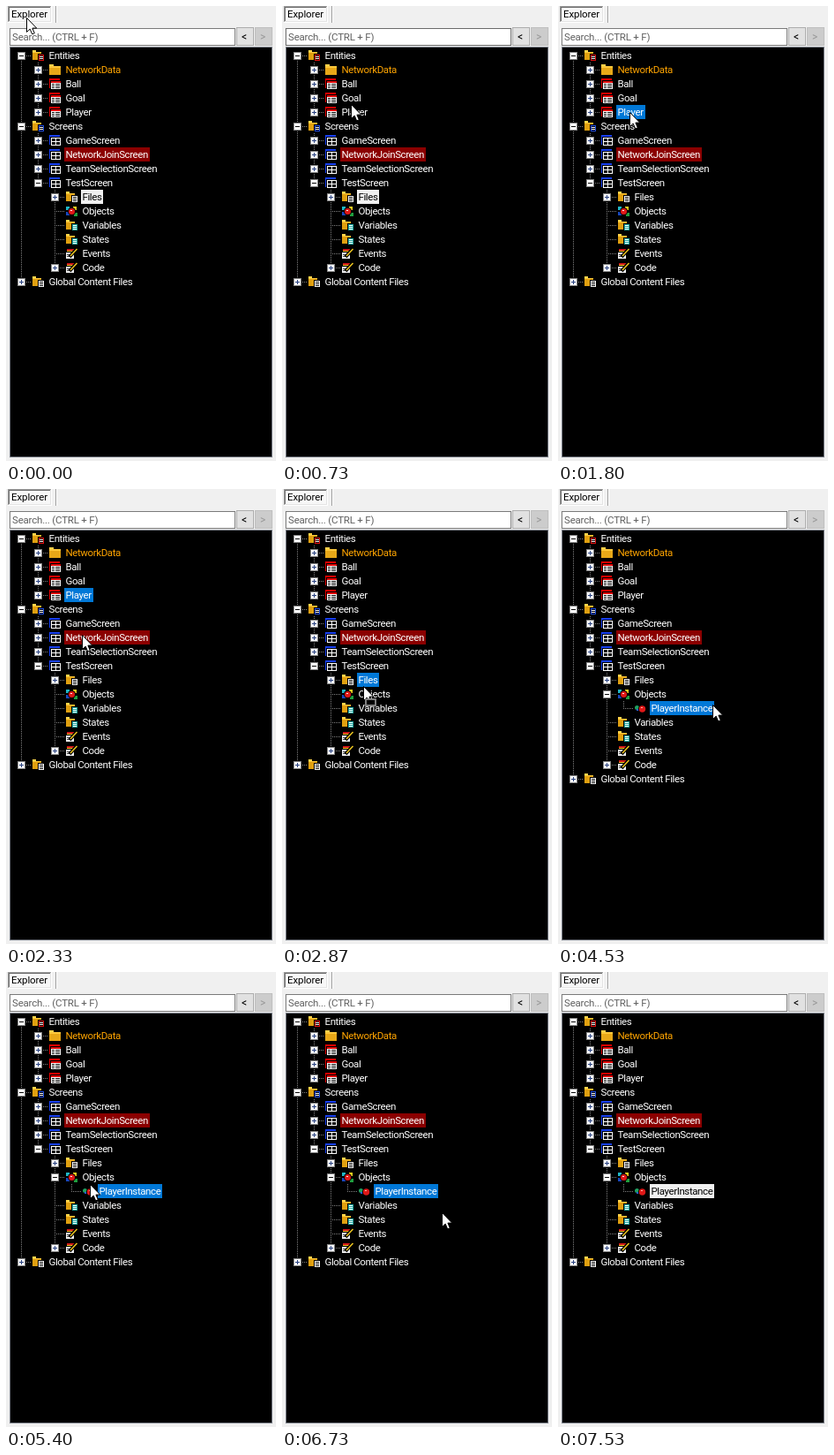
These frames come from a looping animation (306 px wide and 515 px high, 7590 ms). An HTML page with a canvas:

```html
<!DOCTYPE html>
<html lang="en">
<head>
<meta charset="utf-8">
<title>Explorer tree</title>
<style>
  html, body { margin: 0; width: 100%; height: 100%; overflow: hidden; background: #f0f0f0; }
  canvas { display: block; }
</style>
</head>
<body>
<canvas id="stage" width="306" height="515"></canvas>
<script>
const ctx = document.getElementById('stage').getContext('2d');
const LOOP = 7590, TICK = 200 / 3, INDENT = 19, ROW = 16;
const FACE = 'Roboto, "Liberation Sans", sans-serif';
const BLUE = '#0078d7', PALE = '#f0f0f0', GOLD = '#e0a010';

// Pointer path: time, x, y
const path = [
  [0, 24, 14], [730, 79, 112], [800, 80, 116], [930, 82, 120], [1730, 82, 120],
  [2330, 87, 166], [2400, 87, 178], [2530, 89, 202], [3200, 95, 233], [4130, 95, 233],
  [4670, 192, 248], [4930, 177, 247], [5400, 96, 241], [5730, 130, 257],
  [5930, 176, 250], [6200, 102, 236], [6470, 181, 229], [6670, 181, 229],
  [6730, 182, 273], [7200, 89, 520]
];

// level, icon, label, expander sign
const tree = [
  [0, 'entities', 'Entities', '-'],
  [1, 'folder', 'NetworkData', '+'],
  [1, 'entity', 'Ball', '+'],
  [1, 'entity', 'Goal', '+'],
  [1, 'entity', 'Player', '+'],
  [0, 'screens', 'Screens', '-'],
  [1, 'screen', 'GameScreen', '+'],
  [1, 'screen', 'NetworkJoinScreen', '+'],
  [1, 'screen', 'TeamSelectionScreen', '+'],
  [1, 'screen', 'TestScreen', '-'],
  [2, 'files', 'Files', '+'],
  [2, 'objects', 'Objects', ''],
  [2, 'values', 'Variables', ''],
  [2, 'values', 'States', ''],
  [2, 'code', 'Events', ''],
  [2, 'code', 'Code', '+'],
  [0, 'files', 'Global Content Files', '+']
];
const grown = tree.slice();
grown.splice(11, 1, [2, 'objects', 'Objects', '-'], [3, 'instance', 'PlayerInstance', '']);

function box(color, x, y, w, h) {
  ctx.fillStyle = color;
  ctx.fillRect(x, y, w, h);
}

function frame(fill, edge, x, y, w, h) {
  box(edge, x, y, w, h);
  box(fill, x + 1, y + 1, w - 2, h - 2);
}

function disc(color, x, y, r) {
  ctx.fillStyle = color;
  ctx.beginPath();
  ctx.arc(x, y, r, 0, Math.PI * 2);
  ctx.fill();
}

function line(color, width, x1, y1, x2, y2) {
  ctx.strokeStyle = color;
  ctx.lineWidth = width;
  ctx.beginPath();
  ctx.moveTo(x1, y1);
  ctx.lineTo(x2, y2);
  ctx.stroke();
}

function setFont(size, spacing) {
  ctx.font = size + 'px ' + FACE;
  ctx.letterSpacing = spacing + 'px';
}

function label(text, color, x, y) {
  ctx.fillStyle = color;
  ctx.fillText(text, x, y);
}

function dots(x1, y1, x2, y2) {
  ctx.setLineDash([1, 1]);
  line('#808080', 1, x1, y1, x2, y2);
  ctx.setLineDash([]);
}

// Small folder with a lined sheet over its corner
function badge(edge, fill, ink) {
  box('#ffd54a', -6, -6, 4, 2);
  box(GOLD, -6, -4, 10, 9);
  box('#ffc83c', -6, -4, 10, 1);
  box('#000', 0, -2, 8, 9);
  frame(fill, edge, 1, -1, 6, 7);
  box(ink, 2, 1, 4, 1);
  box(ink, 2, 3, 4, 1);
}

// Coloured window with a white grid set towards its lower right
function windowIcon(color, split) {
  box(color, -6, -6, 12, 11);
  box('#000', -5, -4, 11, 9);
  frame('#000', '#fff', -4, -3, 11, 9);
  box('#fff', -4, 1, 11, 1);
  box('#fff', split, -3, 1, 9);
}

const icons = {
  folder() {
    box('#ffd04a', -6, -6, 5, 2);
    box('#e8a818', -6, -4, 13, 10);
    box('#ffc83c', -6, -4, 13, 2);
  },
  entities() { badge('#e01010', '#000', '#fff'); },
  screens() { badge('#2050e0', '#000', '#fff'); },
  files() { badge('#fff', '#000', '#fff'); },
  values() { badge('#20a8a0', '#fff', '#20a8a0'); },
  entity() {
    windowIcon('#e00000', 0);
    box('#e00000', -4, -3, 11, 2);
    box('#fff', -4, -1, 11, 1);
    box('#fff', -4, 3, 11, 1);
  },
  screen() { windowIcon('#1840f0', 1); },
  objects() {
    box('#20b8c8', -6, -5, 4, 4);
    box('#f0d020', 2, -5, 4, 4);
    box('#1848c0', -6, 1, 4, 4);
    box('#20a040', 3, 2, 4, 4);
    disc('#000', 0.5, 0.5, 4.5);
    disc('#e01818', 0.5, 0.5, 3.5);
    box('#fff', -1, -1, 2, 1);
  },
  code() {
    box('#f0f0f0', -6, -1, 9, 7);
    box('#d01818', -5, -5, 9, 2);
    box('#f0c820', -5, -3, 7, 1);
    box('#404040', -5, 1, 6, 1);
    box('#404040', -5, 3, 6, 1);
    line('#000', 4, 7, -6, -2, 4);
    line('#f0c820', 1.5, 6.5, -5, -1, 3);
  },
  instance() {
    disc('#20a060', -3.5, -0.5, 2.5);
    box('#2860d0', -4, 1, 3, 2);
    disc('#000', 2.5, 1, 4.6);
    disc('#e01818', 2.5, 1, 3.7);
    box('#ffb0a0', 1, -1, 2, 1);
  }
};

function drawExpander(x, y, sign) {
  const ink = sign === '+' ? '#27407f' : '#000';
  frame('#fff', '#848484', x - 4, y - 4, 9, 9);
  box(ink, x - 2, y, 5, 1);
  if (sign === '+') box(ink, x, y - 2, 1, 5);
}

function drawTree(rows, picked, pickColor) {
  const last = [56];
  rows.forEach(([level], i) => {
    const x = 17 + level * INDENT, y = 56 + i * ROW;
    dots(x + 0.5, last[level], x + 0.5, y + 1);
    dots(x, y + 0.5, x + 12, y + 0.5);
    last[level] = y;
    last[level + 1] = y + 8;
  });
  setFont(11.5, -0.4);
  rows.forEach(([level, icon, name, sign], i) => {
    const x = 17 + level * INDENT, y = 56 + i * ROW;
    if (sign) drawExpander(x, y, sign);
    ctx.save();
    ctx.translate(x + INDENT, y);
    icons[icon]();
    ctx.restore();

    const back = name === picked ? pickColor : name === 'NetworkJoinScreen' ? '#8b0000' : null;
    if (back) box(back, x + 30, y - 8, Math.floor(ctx.measureText(name).width) + 4, ROW);
    const color = back === PALE ? '#000' : name === 'NetworkData' && !back ? '#ffa500' : '#fff';
    label(name, color, x + 31.5, y + 4);
  });
}

function drawChrome(glow) {
  box('#f0f0f0', 0, 0, 306, 515);
  box('#fff', 2, 0, 50, 19);
  box('#a0a0a0', 2, 0, 49, 18);
  box('#e3e3e3', 3, 1, 48, 17);
  box('#696969', 3, 1, 47, 16);
  box('#f8f8f8', 4, 2, 46, 15);
  box('#a0a0a0', 56, 0, 1, 19);
  box('#fff', 57, 0, 1, 19);
  setFont(11.5, -0.1);
  label('Explorer', '#000', 6, 13);

  const shade = Math.round(122 - 99 * glow);
  frame('#fff', `rgb(${shade},${shade},${shade})`, 4, 25, 256, 20);
  setFont(11.5, -0.2);
  label('Search... (CTRL + F)', '#606060', 7, 39);
  frame('#e1e1e1', '#adadad', 261, 24, 20, 21);
  frame('#cccccc', '#bfbfbf', 282, 24, 20, 21);
  setFont(12, 0);
  label('<', '#000', 267, 39);
  label('>', '#989898', 288, 39);
  frame('#000', '#828790', 4, 46, 298, 465);
}

function drawPointer(x, y, dragging) {
  ctx.save();
  ctx.translate(Math.round(x) - 0.5, Math.round(y) - 0.5);
  ctx.beginPath();
  [[0, 0], [0, 16], [3.7, 12.6], [6.2, 18.4], [8.8, 17.3], [6.4, 11.6], [11.2, 11.6]]
    .forEach(p => ctx.lineTo(...p));
  ctx.closePath();
  ctx.fillStyle = '#fff';
  ctx.fill();
  ctx.strokeStyle = '#000';
  ctx.lineWidth = 1;
  ctx.stroke();
  if (dragging) {
    box('#000', 1.5, 13.5, 13, 9);
    ctx.strokeStyle = '#fff';
    ctx.setLineDash([1, 1]);
    ctx.strokeRect(2, 14, 12, 8);
    ctx.strokeRect(3, 15, 10, 6);
  }
  ctx.restore();
}

// Monotone cubic through the path points
function slope(i, axis) {
  return (path[i + 1][axis] - path[i][axis]) / (path[i + 1][0] - path[i][0]);
}

function tangent(i, axis) {
  if (i === 0 || i === path.length - 1) return 0;
  const a = slope(i - 1, axis), b = slope(i, axis);
  return a * b > 0 ? 2 * a * b / (a + b) : 0;
}

function along(t, axis) {
  const end = path.length - 1;
  if (t >= path[end][0]) return path[end][axis];
  const i = path.findIndex(p => p[0] > t) - 1;
  const h = path[i + 1][0] - path[i][0], s = (t - path[i][0]) / h, r = 1 - s;
  return r * r * (1 + 2 * s) * path[i][axis] + s * s * (1 + 2 * r) * path[i + 1][axis]
    + h * s * r * (r * tangent(i, axis) - s * tangent(i + 1, axis));
}

function selection(t, y) {
  if (t < 1200) return ['Files', PALE];
  if (t < 2400) return ['Player', BLUE];
  if (t < 3870) return [tree[Math.floor((y - 48) / ROW)][2], BLUE];
  return ['PlayerInstance', t < 7530 ? BLUE : PALE];
}

// Search border darkens under the pointer, then fades back
function searchGlow(t, y) {
  if (y < 25 || t >= 800) return 0;
  return y < 45 ? 1 : Math.min(1, (800 - t) / 450);
}

function draw(now) {
  const t = Math.round(Math.floor((now % LOOP + 5) / TICK) * TICK / 10) * 10;
  const x = along(t, 1), y = along(t, 2);
  drawChrome(searchGlow(t, y));
  if (t !== 3870) drawTree(t < 3870 ? tree : grown, ...selection(t, y));
  if (t < 7200) drawPointer(x, y, t >= 2400 && t < 4000);
}

const start = performance.now();
function tick() {
  draw(performance.now() - start);
  requestAnimationFrame(tick);
}
tick();
</script>
</body>
</html>
```
